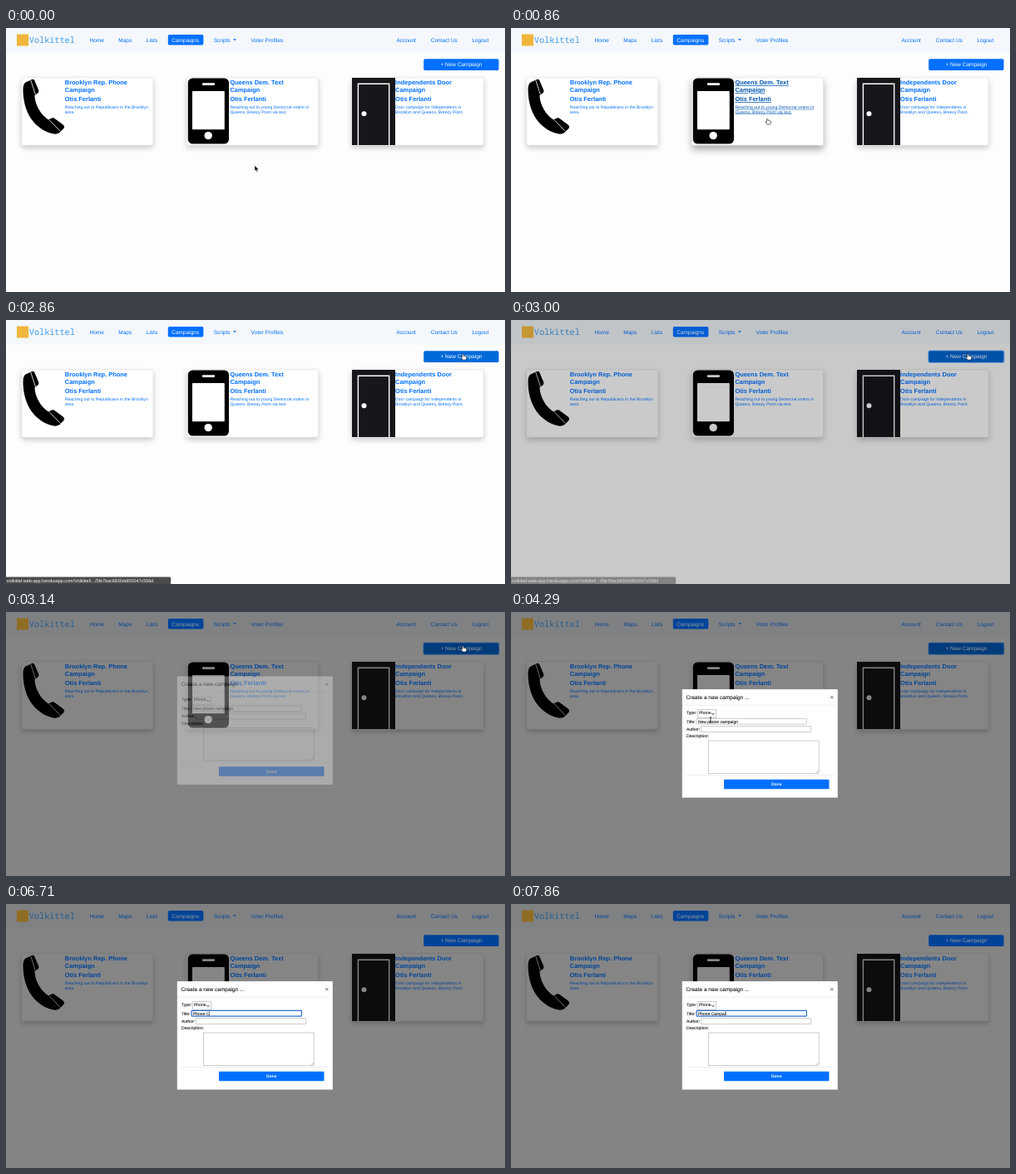
An HTML page for the animation above (8 s loop, 600 by 318 pixels).

```html
<!DOCTYPE html>
<html lang="en">
<head>
<meta charset="utf-8">
<title>Campaigns</title>
<style>
  html, body { margin: 0; width: 100%; height: 100%; overflow: hidden; background: #fdfdfe; }
  svg { display: block; width: 100vw; height: 100vh; }
  text { font-family: "Liberation Sans", Arial, sans-serif; text-rendering: geometricPrecision; white-space: pre; }
  .bold { font-weight: 700; }
  .blue { fill: #0070ff; }
  .white { fill: #fff; }
  .dark { fill: #16181b; stroke: #16181b; stroke-width: .1; }
  .logo { font-family: "Noto Sans Mono", "DejaVu Sans Mono", monospace; fill: #3f9bea; }
  .card { fill: #fff; stroke: #dcdcde; stroke-width: .5; filter: drop-shadow(0 3px 3px rgba(0, 0, 0, .2)); }
  .card.hover { filter: drop-shadow(0 5px 4.5px rgba(0, 0, 0, .32)); }
  .copy.hover text { fill: #0056b3; text-decoration: underline; }
  .field { fill: #fff; stroke: #98989c; stroke-width: .5; }
  .field.focus { stroke: #2a6dd2; stroke-width: 1.2; }
  .rule { stroke: #dee2e6; stroke-width: .6; }
  .pointer { fill: #fff; stroke: #111; stroke-width: .6; stroke-linejoin: round; }
</style>
</head>
<body>
<svg id="stage" viewBox="0 0 600 318" preserveAspectRatio="none"></svg>
<script>
const STEP = 1000 / 7;
const LOOP = 8000;
const MODAL_Y = 20.8;

const text = (x, y, size, words, cls = "blue", more = "") =>
  `<text x="${x}" y="${y}" font-size="${size}" class="${cls}" ${more}>${words}</text>`;
const rect = (x, y, w, h, more = "") =>
  `<rect x="${x}" y="${y}" width="${w}" height="${h}" ${more}/>`;

const links = [
  [100.5, "Home"], [135.3, "Maps"], [168.8, "Lists"], [249.7, "Scripts"],
  [294.6, "Voter Profiles"], [469.4, "Account"], [510.7, "Contact Us"], [560.4, "Logout"]
];

const cards = [
  { x: 18.7, title: "Brooklyn Rep. Phone",
    lines: ["Reaching out to Republicans in the Brooklyn", "area."] },
  { x: 217.3, title: "Queens Dem. Text", id: "5fe7ba6c830ddf00047c556c",
    lines: ["Reaching out to young Democrat voters in", "Queens, Breezy Point via text."] },
  { x: 416, title: "Independents Door", id: "5fe7bac6830ddf00047c556d",
    lines: ["Door campaign for Independents in", "Brooklyn and Queens, Breezy Point."] }
];

const icons = `
  <path d="M23.5 65.5 L31 62 Q33.2 61.2 34.2 63 L39.3 75 Q40 77.5 38 78.8 L34.5 81 C34.5 92 42 105 51 110.5
    L55 108.6 Q57 107.8 58.8 109.2 L69 116.8 Q71 118.8 69.4 121 L64.5 126 Q60 129 53 126.5
    C35 120.5 20.5 103 20.5 74 Q20.5 67.5 23.5 65.5Z"/>
  <path d="M29.8 63 L35.4 80.2 M52 110.6 L65.4 124.6" stroke="#fff" stroke-width=".8"/>
  ${rect(218.8, 60.4, 49.2, 79.2, 'rx="5.5"')}
  <g fill="#fff">
    ${rect(224, 76, 38.8, 46.3, 'rx=".8"')}
    ${rect(236, 66.3, 15, 2.6, 'rx=".8"')}
    <circle cx="243.2" cy="129.6" r="4.7"/>
  </g>
  ${rect(416, 60, 52, 81, 'fill="#17161a"')}
  <path d="M423.4 141 V67.2 H460.7 V141" fill="none" stroke="#fff" stroke-width="1.4"/>
  <circle cx="430.5" cy="103.2" r="3" fill="#fff"/>`;

const cardCopy = ({ x, title, lines }) => {
  const left = x + 52.1;
  return `<g class="copy">
    ${text(left, 68, 7.45, title, "blue bold")}
    ${text(left, 77, 7.45, "Campaign", "blue bold")}
    ${text(left, 88.2, 7.45, "Otis Ferlanti", "blue bold")}
    ${lines.map((line, i) => text(left, 96.8 + i * 5.7, 5.08, line)).join("")}
  </g>`;
};

const base = `
  ${rect(0, 0, 600, 318, 'fill="#fdfdfe"')}
  ${rect(0, 0, 600, 29.5, 'fill="#f4f7fb"')}
  ${cards.map(c => rect(c.x, 59.8, 158.2, 81.4, 'rx="2" class="card"')).join("")}
  ${icons}`;

const ink = `
  ${rect(13, 7.5, 14, 14, 'fill="#f0b63c"')}
  ${text(27.8, 17.8, 10.2, "Volkittel", "logo")}
  ${links.map(([x, word]) => text(x, 16.7, 6.5, word)).join("")}
  <path d="M273 13.2 h4 l-2 2.1z" class="blue"/>
  ${rect(194.8, 8, 42.6, 12.4, 'rx="1.7" class="blue"')}
  ${text(199.3, 16.7, 6.5, "Campaigns", "white")}
  ${rect(502.2, 37.2, 90.3, 13.8, 'rx="1.7" id="add"')}
  ${text(547.4, 46.4, 6.5, "+ New Campaign", "white", 'text-anchor="middle"')}
  ${cards.map(cardCopy).join("")}`;

const modal = `
  ${rect(205.8, 93.1, 187, 130.5, 'fill="#fff"')}
  ${text(210.6, 105, 6.5, "Create a new campaign ...", "dark")}
  <path d="M384.3 101.2 l3 3 m0 -3 l-3 3" stroke="#444" stroke-width=".8"/>
  <path d="M206 112.2 H393 M211 196.5 H388" class="rule"/>
  ${text(211, 122.5, 5, "Type:", "dark")}
  ${rect(224.2, 117.8, 22.6, 9.8, 'class="field"')}
  ${text(226, 122.8, 5, "Phone", "dark")}
  <path d="M241.3 122 l1.6 1.6 l1.6 -1.6" fill="none" stroke="#111" stroke-width=".9"/>
  ${text(211, 133.6, 5, "Title:", "dark")}
  ${rect(223.2, 128.4, 132.2, 6.8, 'rx=".6" class="field" id="titleBox"')}
  ${rect(224.8, 129.3, 48.5, 5.1, 'fill="#b3d7ff" id="selection"')}
  ${text(225, 133.6, 4.97, "", "dark", 'id="value"')}
  ${rect(225, 129.4, .5, 5, 'fill="#111" id="caret"')}
  ${text(211, 142.8, 5, "Author:", "dark")}
  ${rect(228.4, 137.6, 132.4, 7, 'rx=".6" class="field"')}
  ${text(211, 151.2, 5.1, "Description:", "dark")}
  ${rect(237.5, 155, 132.6, 39.4, 'class="field"')}
  <path d="M366.8 193.7 l2.6 -2.6 m-1.2 2.6 l1.2 -1.2" stroke="#777" stroke-width=".4"/>
  ${rect(256, 201.8, 126.5, 11.5, 'rx="1" class="blue"')}
  ${text(319.2, 209.3, 5, "Done", "white bold", 'text-anchor="middle"')}`;

const pointers = `
  <path id="arrow" d="M0 0 V6.8 L1.6 5.4 L2.7 8 L3.9 7.5 L2.8 5 H4.9Z" fill="#000" stroke="#fff" stroke-width=".5"/>
  <path id="hand" class="pointer" d="M-.8 .8 Q0 -.6 .8 .8 V2.6 Q1.8 2 2.2 2.9 Q3.2 2.4 3.5 3.3 Q4.4 3.1 4.4 4.1
    Q4.4 6.4 3.2 7.2 H-.2 Q-1.4 6 -2.4 4.1 Q-2.2 3 -.8 4.2Z"/>
  <path id="beam" d="M-1.3 -3.4 Q0 -3.4 0 -2.6 Q0 -3.4 1.3 -3.4 M0 -2.8 V2.8
    M-1.3 3.4 Q0 3.4 0 2.6 Q0 3.4 1.3 3.4" fill="none" stroke="#111" stroke-width=".7"/>`;

const stage = document.getElementById("stage");
stage.innerHTML = `
  ${base}
  ${rect(0, 0, 600, 318, 'id="shade"')}
  <g id="ink">${ink}</g>
  <g id="modal">${modal}</g>
  <g id="status">
    <path d="M0 318 V309.6 H196.6 Q198.2 309.6 198.2 311.2 V318Z" fill="#1f1f21"/>
    ${text(.8, 315.6, 5.45, "", "white", 'id="url"')}
  </g>
  <g id="cursor">${pointers}</g>`;

const el = id => document.getElementById(id);
const show = (id, on) => { el(id).style.display = on ? "" : "none"; };
const clamp = v => Math.min(1, Math.max(0, v));
const smooth = v => v * v * (3 - 2 * v);

// Cubic-bezier(0, 0, .58, 1), solved by bisection.
function easeOut(x) {
  let lo = 0, hi = 1;
  for (let i = 0; i < 24; i++) {
    const s = (lo + hi) / 2;
    if (3 * (1 - s) * s * s * .58 + s ** 3 < x) lo = s; else hi = s;
  }
  return 3 * (1 - lo) * lo * lo + lo ** 3;
}

// Pointer stops: tick, x, y.
const stops = [
  [0, 299, 165.5], [8, 310, 98.5], [10, 310, 98.5], [12, 312, 97], [13, 312, 97], [19, 549.5, 40.8],
  [23, 549.5, 40.8], [29, 240, 130], [30, 240, 130], [33, 268, 132], [60, 268, 132]
];

function pointerAt(tick) {
  const i = stops.findIndex(s => s[0] > tick);
  const [t0, x0, y0] = stops[i - 1], [t1, x1, y1] = stops[i];
  const k = smooth((tick - t0) / (t1 - t0));
  return [x0 + (x1 - x0) * k, y0 + (y1 - y0) * k];
}

const inside = (px, py, x, y, w, h) => px >= x && px <= x + w && py >= y && py <= y + h;

const keyTicks = [40, 42, 43, 44, 45, 46, 47, 49, 50, 52, 53, 55];
const phrase = "Phone Campai";
const cardEls = [...document.querySelectorAll(".card")];
const copyEls = [...document.querySelectorAll(".copy")];

function drawPointer(tick, x, y, onPage, hoverCard, onAdd) {
  const hand = onPage && (hoverCard >= 0 || onAdd);
  const beam = !onPage && inside(x, y, 223, 128, 133, 8);
  el("cursor").setAttribute("transform", `translate(${x} ${y})`);
  show("cursor", tick < 40);
  show("hand", hand);
  show("beam", beam);
  show("arrow", !hand && !beam);
}

function drawForm(tick) {
  const typed = keyTicks.filter(k => k <= tick).length;
  const focus = tick >= 32;
  const value = el("value");
  value.textContent = typed ? phrase.slice(0, typed) : "New phone campaign";
  el("titleBox").classList.toggle("focus", focus);
  show("selection", tick >= 33 && !typed);
  show("caret", typed > 0);
  el("caret").setAttribute("x", 225.2 + value.getComputedTextLength());
}

function draw(time) {
  const tick = Math.floor((time + 5) / STEP);
  const now = tick * STEP;
  const [x, y] = pointerAt(tick);
  const onPage = tick < 24;
  const onAdd = onPage && inside(x, y, 502, 37, 91, 14);
  const hoverCard = onPage ? cards.findIndex(c => inside(x, y, c.x, 60, 158, 81)) : -1;

  cardEls.forEach((c, i) => c.classList.toggle("hover", i === hoverCard));
  copyEls.forEach((c, i) => c.classList.toggle("hover", i === hoverCard));

  const focused = tick >= 21 && tick < 32;
  const add = el("add");
  add.setAttribute("fill", focused ? "#0062cc" : onAdd ? "#0069d9" : "#0070ff");
  add.setAttribute("stroke", focused ? "#007bff80" : "none");
  add.setAttribute("stroke-width", 1.6);

  el("status").setAttribute("opacity", tick < 20 ? clamp((tick - 6) / 3) : clamp((22 - tick) * .4));
  el("url").textContent = "volkittel-web-app.herokuapp.com/Volkittel/.../" + cards[tick < 16 ? 1 : 2].id;

  const dim = clamp((now - 2935) / 150);
  el("shade").setAttribute("opacity", dim * .48);
  el("ink").style.filter = dim ? `brightness(${1 - dim * .4})` : "none";

  const opening = now - 3095;
  const lift = MODAL_Y * (easeOut(clamp(opening / 300)) - 1);
  el("modal").setAttribute("opacity", clamp(opening / 150));
  el("modal").setAttribute("transform", `translate(0 ${lift})`);

  drawForm(tick);
  drawPointer(tick, x, y, onPage, hoverCard, onAdd);
}

const start = performance.now();
function loop() {
  draw((performance.now() - start) % LOOP);
  requestAnimationFrame(loop);
}
loop();
</script>
</body>
</html>
```
